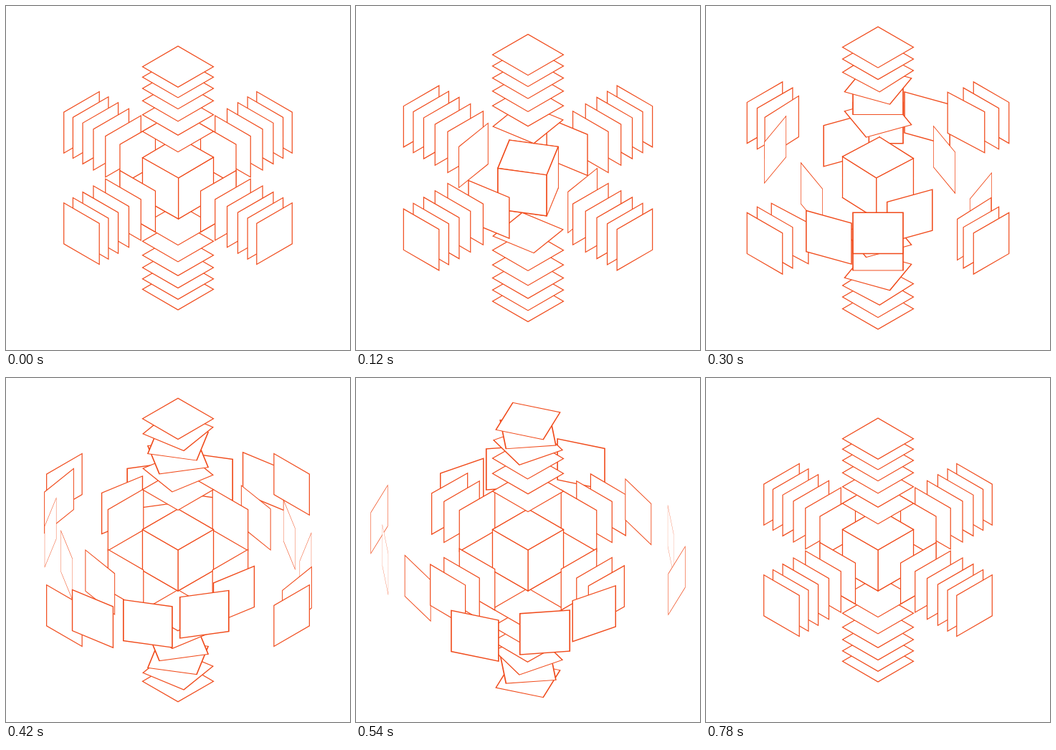
An HTML page with a canvas for the animation above (0.84 s loop, 480 px wide and 480 px high).

```html
<!DOCTYPE html>
<html>
<head>
<meta charset="utf-8">
<style>
  html, body { margin: 0; width: 100%; height: 100%; overflow: hidden; background: #fff; }
  canvas { display: block; }
</style>
</head>
<body>
<canvas id="stage" width="480" height="480"></canvas>
<script>
const ctx = document.getElementById('stage').getContext('2d');
const HALF = 35, SHELLS = 7, STEP_MS = 60, STEPS = 14;
const TILT_SIN = Math.sqrt(1 / 3), TILT_COS = Math.sqrt(2 / 3);

const smooth = u => {
  u = Math.min(1, Math.max(0, u));
  return u * u * (3 - 2 * u);
};

// Isometric view: x to the right, z towards the viewer, h upwards
const project = ([x, z, h]) => [x, z * TILT_SIN - h * TILT_COS];
const depth = ([x, z, h]) => z * TILT_COS + h * TILT_SIN;

// Six square faces at distance d from the centre, turned about the vertical axis;
// u and v are the unit directions of each face's sides
function shellFaces(d, turn) {
  const faces = [];
  for (let k = 0; k < 4; k++) {
    const a = Math.PI / 4 + k * Math.PI / 2 - turn;
    const c = Math.cos(a), s = Math.sin(a);
    faces.push({ center: [d * c, d * s, 0], u: [-s, c, 0], v: [0, 0, 1] });
  }
  const c = Math.cos(Math.PI / 4 - turn), s = Math.sin(Math.PI / 4 - turn);
  for (const h of [-d, d]) {
    faces.push({ center: [0, 0, h], u: [c, s, 0], v: [-s, c, 0] });
  }
  return faces;
}

// The outline lies in the face's plane, so it thins as the face turns edge-on
function drawFace({ center, u, v }) {
  const square = [-HALF, -HALF, 2 * HALF, 2 * HALF];
  ctx.save();
  ctx.translate(240, 240);
  ctx.transform(...project(u), ...project(v), ...project(center));
  ctx.fillRect(...square);
  ctx.strokeRect(...square);
  ctx.restore();
}

function draw() {
  const step = Math.floor(performance.now() / STEP_MS) % STEPS;
  const tick = Math.ceil(1 + step * 23 / 7);
  const spread = 1 - Math.abs((tick - 22.5) / 21.5) ** 2.3;

  const faces = [];
  for (let i = 0; i < SHELLS; i++) {
    const d = i ? 29.4 + 50.2 * i ** 0.65 + spread * (21.5 + 2.1 * i) : HALF;
    const turn = Math.PI / 2 * smooth(tick / 20 - i / 5);
    faces.push(...shellFaces(d, turn));
  }
  faces.sort((a, b) => depth(a.center) - depth(b.center));

  ctx.fillStyle = '#fff';
  ctx.fillRect(0, 0, 480, 480);
  ctx.strokeStyle = '#f04a1a';
  ctx.lineWidth = 1.7;
  faces.forEach(drawFace);
  requestAnimationFrame(draw);
}
draw();
</script>
</body>
</html>
```
